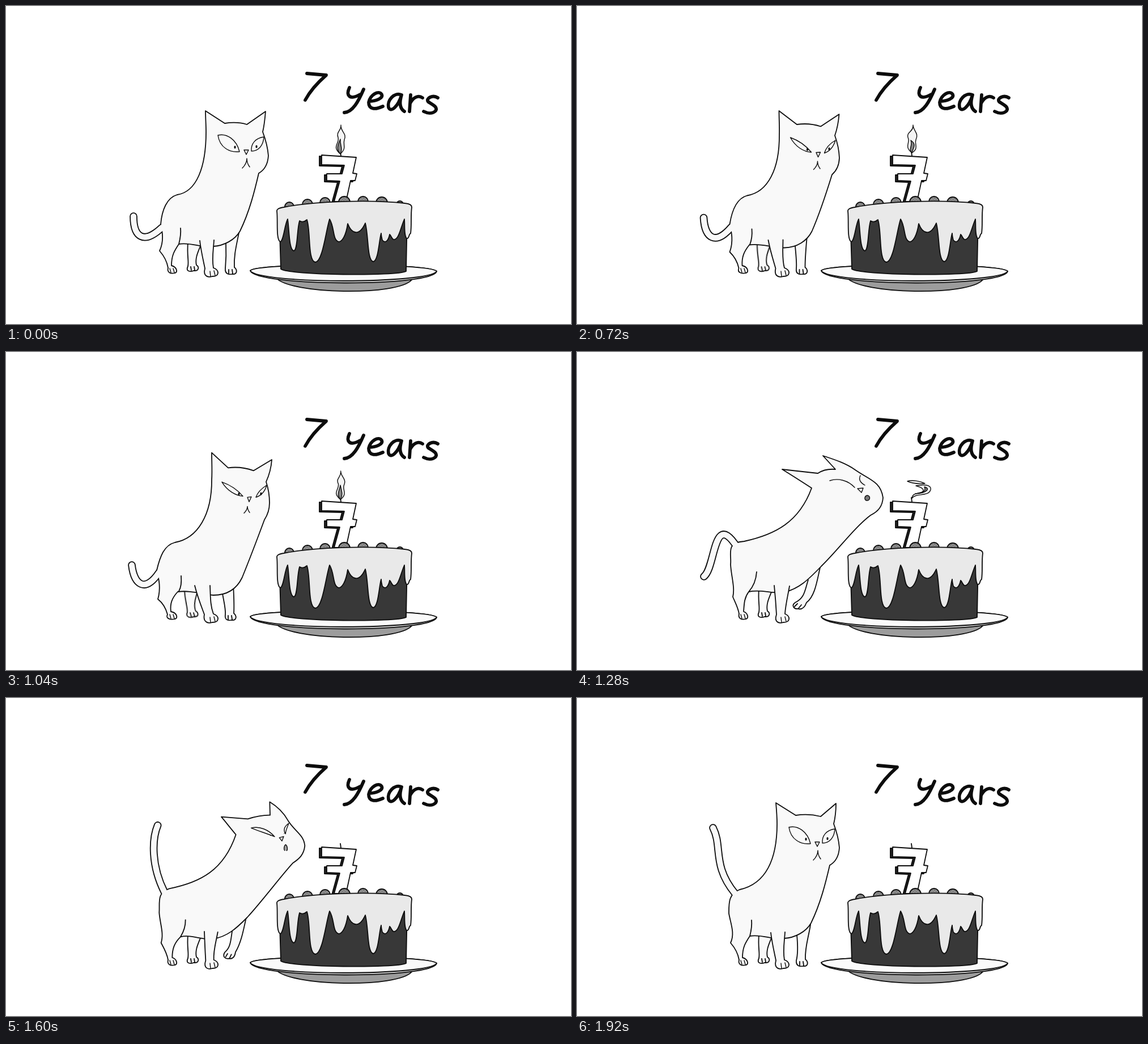
An HTML page that plays this animation: 997 by 561 pixels, repeating every 2410 ms.

```html
<!DOCTYPE html>
<html lang="en">
<head>
<meta charset="utf-8">
<title>7 years</title>
<style>
html, body { margin: 0; width: 100%; height: 100%; overflow: hidden; background: #fff; }
svg { display: block; width: 100%; height: 100%; }
path, circle { stroke: #0c0c0c; stroke-width: 1.8; stroke-linecap: round; stroke-linejoin: round; }
.line { fill: none; }
.fur { fill: #f9f9f9; }
.thin { stroke-width: 1.4; }
.lettering path { fill: none; stroke-width: 5.8; }

/* Drawn on 80 ms steps: most pose changes take two of them */
.anim { animation: 2410ms steps(2) infinite; }
.body { animation-name: body; }
.tail { animation-name: tail; fill: none; stroke-width: 13.6; }
.tail.inside { stroke: #f9f9f9; stroke-width: 10; }
.near { animation-name: near; }
.far { animation-name: far; }
.hind { animation-name: hind; transform-origin: 325px 468px; }
.face { animation-name: face; fill: none; }
.pupils { animation-name: pupils; }
.mouth { animation-name: mouth; }
.puff { animation-name: puff; fill: none; }
.flame { animation-name: flame; fill: #f4f4f4; }
.core { animation-name: core; fill: #858585; }
.wisp { animation-name: wisp; fill: #eee; }
.fire { animation-name: fire; }

@keyframes body {
  0%, 23.237% { animation-timing-function: steps(4); d: path("M352,185 L386,207 C399,205 412,205 425,209 L458,186 C457,198 456,210 453,222 C459,238 462,252 463,264 C462,280 455,290 446,295 C439,325 430,362 413,397 C404,413 384,423 366,424 C345,427 325,416 305,420 C297,432 292,440 292,458 C301,460 304,470 298,471 C290,473 284,470 286,462 C284,450 278,440 271,432 C279,415 276,398 273,385 C275,360 284,338 302,333 C336,328 353,285 353,222 C353,210 352,197 352,185Z M308,392 C309,402 307,412 305,420") }
  36.515% { animation-timing-function: steps(3); d: path("M361,185 L390,211 C405,209 421,211 435,216 L467,196 C466,210 462,224 457,235 C461,247 463,258 463,272 C463,284 459,293 454,300 C444,325 430,362 416,398 C408,416 392,429 366,429 C345,427 325,420 303,423 C293,434 289,444 291,458 C302,460 304,470 298,471 C290,473 281,470 285,463 C282,452 277,443 268,436 C274,415 269,398 266,385 C272,360 279,341 298,336 C338,329 362,290 361,232 C362,217 361,201 361,185Z M309,395 C310,407 308,417 305,422") }
  46.473% { d: path("M364,174 L393,201 C408,199 424,201 438,206 L470,187 C469,201 465,215 460,226 C464,238 466,249 466,263 C466,276 462,286 457,294 C447,322 432,362 417,398 C408,416 392,429 366,429 C345,427 325,420 303,423 C293,434 289,444 291,458 C302,460 304,470 298,471 C290,473 281,470 285,463 C282,452 277,443 268,436 C274,415 269,398 266,385 C272,360 279,341 298,336 C338,329 364,286 364,222 C365,206 364,190 364,174Z M309,395 C310,407 308,417 305,422") }
  53.112% { d: path("M362,207 L425,214 C434,208 445,206 456,207 L434,183 C455,190 474,196 491,208 C515,225 536,228 540,257 C539,272 532,281 518,288 C490,309 460,350 431,378 C407,403 392,417 366,424 C345,427 325,418 303,423 C295,434 295,444 294,458 C301,460 304,470 298,471 C290,473 284,470 286,462 C284,450 278,440 275,432 C279,415 272,395 271,375 C273,355 262,336 295,334 C350,322 392,300 414,240 C397,229 380,218 362,207Z M317,388 C316,402 311,414 303,423") }
  59.751%, 63.07% { animation-timing-function: steps(3); d: path("M392,217 L443,215 C455,210 467,206 480,206 L468,182 C486,188 501,196 512,208 C528,231 549,232 551,257 C549,273 543,279 530,286 C505,304 464,349 431,382 C407,404 394,419 366,425 C348,428 327,417 310,422 C297,432 294,444 294,458 C301,460 304,470 298,471 C290,473 284,470 286,462 C284,450 278,440 275,432 C279,415 272,398 271,378 C273,360 264,342 288,336 C345,324 395,313 425,245 C414,236 403,226 392,217Z M321,391 C321,404 317,412 310,422") }
  73.029% { d: path("M356,195 L394,210 C408,208 424,207 438,208 L460,186 C465,199 467,214 468,231 C474,246 478,258 480,268 C479,283 468,292 458,302 C447,332 434,370 415,397 C404,413 384,424 366,425 C345,427 325,416 304,420 C297,432 292,440 292,458 C301,460 304,470 298,471 C290,473 284,470 286,462 C284,450 278,440 271,432 C279,415 271,398 269,380 C269,362 269,347 288,337 C340,328 363,285 367,233 C363,220 360,208 356,195Z M308,392 C309,402 307,412 304,420") }
  79.668%, 100% { d: path("M351,185 L386,207 C399,205 414,205 430,209 L457,186 C457,198 456,210 453,222 C459,238 462,252 463,264 C462,280 455,290 446,295 C439,325 430,362 413,397 C404,413 384,423 366,424 C345,427 325,416 305,420 C297,432 292,440 292,458 C301,460 304,470 298,471 C290,473 284,470 286,462 C284,450 278,440 271,432 C279,415 271,398 268,380 C268,362 267,346 287,338 C333,328 353,285 353,222 C353,210 352,197 351,185Z M308,392 C309,402 307,412 305,420") }
}
@keyframes tail {
  0%, 23.237% { animation-timing-function: steps(4); d: path("M225,371 C225,408 243,421 275,391") }
  36.515%, 46.473% { d: path("M222,376 C226,410 245,426 270,389") }
  53.112% { d: path("M224,396 C245,380 240,277 283,345") }
  59.751%, 63.07% { animation-timing-function: steps(3); d: path("M280,223 C257,243 262,295 280,342") }
  73.029% { d: path("M243,228 C259,260 243,295 279,344") }
  79.668%, 100% { d: path("M240,229 C257,262 238,295 279,345") }
}
@keyframes near {
  0%, 23.237% { animation-timing-function: steps(4); d: path("M342,414 C344,432 348,448 351,463 C347,478 358,479 364,477 C377,477 377,466 366,462 C363,446 366,430 367,413") }
  36.515%, 46.473% { d: path("M333,412 C338,432 344,447 350,463 C347,478 358,479 364,477 C377,477 377,466 366,462 C360,446 361,430 360,412") }
  53.112% { d: path("M348,412 C350,432 351,445 352,463 C347,478 358,479 364,477 C377,477 377,466 367,462 C368,446 372,430 375,413") }
  59.751%, 63.07% { animation-timing-function: steps(3); d: path("M354,411 C354,430 353,445 353,463 C348,478 358,479 364,477 C377,477 377,466 367,462 C367,446 373,430 377,413") }
  73.029%, 100% { d: path("M342,414 C344,432 348,448 351,463 C347,478 358,479 364,477 C377,477 377,466 366,462 C363,446 366,430 367,413") }
}
@keyframes far {
  0%, 23.237% { animation-timing-function: steps(4); d: path("M388,418 C389,440 388,452 387,463 C386,474 395,474 399,473 C409,474 408,465 403,461 C402,440 406,425 411,400 M393,465 L393,472 M399,465 L400,472") }
  36.515%, 46.473% { d: path("M381,420 C384,440 388,452 387,463 C385,474 394,474 398,473 C408,474 407,465 402,461 C403,445 402,430 401,410 M392,465 L392,472 M398,465 L399,472") }
  53.112% { d: path("M408,402 C402,420 402,434 385,442 C377,448 384,454 390,453 C397,455 402,450 405,442 C421,430 424,400 430,376 M389,444 L384,449 M396,446 L391,452") }
  59.751%, 63.07% { animation-timing-function: steps(3); d: path("M405,405 C400,420 400,434 386,441 C378,448 384,454 390,453 C397,455 402,450 406,442 C421,428 424,405 430,380 M390,444 L385,449 M397,446 L392,452") }
  73.029%, 100% { d: path("M388,418 C390,440 390,452 387,463 C386,474 395,474 399,473 C409,474 408,465 403,461 C402,440 408,425 412,400 M393,465 L393,472 M399,465 L400,472") }
}
@keyframes hind {
  0%, 23.237% { animation-timing-function: steps(4); transform: skewX(0deg) }
  36.515%, 46.473% { transform: skewX(7deg) }
  53.112%, 100% { transform: skewX(0deg) }
}
@keyframes face {
  0% { animation-timing-function: steps(5); d: path("M374,228 C390,224 407,236 412,257 C395,259 377,250 374,228 M455,231 C440,233 432,243 433,256 C445,256 454,247 455,231 M420,254 L428,254 L424,262Z") }
  16.597%, 23.237% { animation-timing-function: steps(4); d: path("M374,228 C388,233 402,244 411,255 C398,255 383,246 374,228 M454,233 C446,237 437,246 434,256 C445,253 450,245 454,233 M420,254 L428,254 L424,262Z") }
  36.515% { animation-timing-function: steps(3); d: path("M379,236 C393,241 407,250 416,261 C403,260 388,251 379,236 M458,241 C450,246 442,253 439,263 C449,259 455,252 458,241 M424,263 L431,262 L427,271Z") }
  46.473% { d: path("M382,226 C396,231 410,240 419,251 C406,250 391,241 382,226 M461,232 C453,237 445,244 442,253 C452,250 458,243 461,232 M427,253 L434,252 L430,261Z") }
  53.112% { d: path("M446,227 C460,222 478,226 490,239 C478,226 460,222 446,227 M500,218 C497,224 499,230 508,235 C499,230 497,224 500,218 M495,241 L505,240 L502,248Z") }
  59.751%, 63.07% { animation-timing-function: steps(3); d: path("M455,231 C470,226 485,230 497,240 C485,230 470,226 455,231 M515,216 C509,223 509,227 516,232 C509,227 509,223 515,216 M505,242 L513,239 L510,247Z") }
  73.029% { d: path("M388,226 C403,225 420,237 428,254 C410,257 391,250 388,226 M467,231 C455,234 447,243 448,255 C460,255 467,247 467,231 M437,255 L444,255 L441,263Z") }
  79.668%, 100% { d: path("M374,228 C390,224 407,236 412,257 C395,259 377,250 374,228 M455,231 C440,233 432,243 433,256 C445,256 454,247 455,231 M420,254 L428,254 L424,262Z") }
}
@keyframes pupils {
  0%, 23.237% { animation-timing-function: steps(4); stroke-width: 3px; d: path("M404,248 L404,250 M442,247 L442,249") }
  36.515% { animation-timing-function: steps(3); stroke-width: 3px; d: path("M409,256 L409,258 M448,255 L448,257") }
  46.473% { stroke-width: 3px; d: path("M412,246 L412,248 M451,246 L451,248") }
  53.112%, 63.07% { animation-timing-function: steps(3); stroke-width: 0px; d: path("M490,239 L490,239 M508,235 L508,235") }
  73.029% { stroke-width: 3px; d: path("M420,248 L420,250 M457,246 L457,248") }
  79.668%, 100% { stroke-width: 3px; d: path("M404,248 L404,250 M442,247 L442,249") }
}
@keyframes mouth {
  0%, 23.237% { animation-timing-function: steps(4); fill: #f9f9f9; d: path("M417,286 C421,282 425,275 425,269 C425,275 427,280 430,284") }
  36.515% { animation-timing-function: steps(3); fill: #f9f9f9; d: path("M418,291 C421,288 424,283 424,279 C424,283 425,286 428,290") }
  46.473% { fill: #f9f9f9; d: path("M421,281 C424,278 427,273 427,269 C427,273 428,276 431,280") }
  53.112% { fill: #777; d: path("M512,262 C506,262 507,254 512,253 C518,253 518,262 512,262") }
  59.751%, 63.07% { animation-timing-function: steps(3); fill: #777; d: path("M519,262 C514,261 514,254 518,254 C523,254 523,262 519,262") }
  73.029% { fill: #f9f9f9; d: path("M437,283 C441,279 444,273 444,268 C444,274 446,279 448,284") }
  79.668%, 100% { fill: #f9f9f9; d: path("M417,286 C421,282 425,275 425,269 C425,275 427,280 430,284") }
}
@keyframes puff {
  0%, 59.75% { opacity: 0; animation-timing-function: step-end }
  59.751% { opacity: 1; animation-timing-function: step-end }
  66.39%, 100% { opacity: 0 }
}
@keyframes flame {
  0%, 23.237% { d: path("M590,261 C574,248 589,243 586,232 C582,222 592,220 591,210 C590,222 602,224 597,236 C594,246 602,250 590,261Z") }
  6.639% { animation-timing-function: steps(3); d: path("M590,260 C575,246 590,243 586,231 C582,222 593,221 591,210 C592,222 602,222 596,236 C594,245 602,251 590,260Z") }
  16.597%, 29.875% { d: path("M591,259 C576,247 589,242 584,232 C581,222 594,222 593,210 C593,220 604,224 598,236 C595,244 604,251 591,259Z") }
  36.515% { animation-timing-function: steps(3); d: path("M591,259 C575,246 589,243 587,233 C580,223 593,222 590,210 C592,218 601,222 595,234 C592,240 606,249 591,259Z") }
  46.473% { d: path("M590,261 C574,248 589,243 586,232 C582,222 592,220 591,210 C590,222 602,224 597,236 C594,246 602,250 590,261Z") }
  53.112% { animation-timing-function: step-end; d: path("M591,258 C592,245 612,252 611,243 C608,238 603,238 598,236 C612,233 626,234 624,243 C620,256 598,248 591,258Z") }
  56.432%, 100% { d: path("M640,247 C655,242 668,247 676,242 C682,239 690,238 700,239 C708,237 720,237 730,240 C705,250 670,252 640,247Z") }
}
@keyframes core {
  0%, 23.237% { d: path("M590,261 C581,252 587,243 590,235 C589,246 595,250 590,261Z") }
  6.639% { animation-timing-function: steps(3); d: path("M590,260 C585,252 591,245 590,235 C596,244 594,252 590,260Z") }
  16.597%, 29.875% { d: path("M591,259 C584,252 593,246 589,237 C600,244 593,251 591,259Z") }
  36.515% { animation-timing-function: steps(3); d: path("M591,258 C585,252 592,245 590,235 C599,247 595,252 591,258Z") }
  46.473% { d: path("M590,261 C581,252 587,243 590,235 C589,246 595,250 590,261Z") }
  53.112% { animation-timing-function: step-end; d: path("M597,250 C608,249 617,246 613,238 C624,240 618,249 597,250Z") }
  56.432%, 100% { d: path("M664,247 C678,246 690,243 703,243 C695,247 680,249 664,247Z") }
}
@keyframes wisp {
  0%, 53.111% { opacity: 0; animation-timing-function: step-end }
  53.112% { opacity: 1; transform: none; animation-timing-function: step-end }
  56.432%, 100% { opacity: 1; transform: translate(66px, 2px) }
}
@keyframes fire {
  0%, 59.75% { opacity: 1; animation-timing-function: step-end }
  59.751%, 100% { opacity: 0 }
}
</style>
</head>
<body>
<svg viewBox="0 0 997 561">
  <defs>
    <pattern id="seeds" width="5" height="5" patternUnits="userSpaceOnUse">
      <rect width="5" height="5" fill="#808080"/>
      <path d="M1,1.5h.4M3.5,3.8h.4" style="stroke:#b4b4b4;stroke-width:1.2"/>
    </pattern>
    <path id="seven" d="M557,263 L618,267 L612,295 L619,296 L616,308 L608,308 L600,345 L579,345 L589,309 L566,308 L566,296 L593,296 L597,281 L557,280Z"/>
  </defs>

  <g class="lettering" role="img" aria-label="7 years">
    <path d="M531,119 L565,122 C549,136 537,149 528,166"/>
    <path d="M606,144 C600,157 605,167 625,156 M631,147 C622,168 612,187 597,188"/>
    <path d="M641,168 C654,168 666,162 663,156 C658,148 643,156 640,170 C640,183 652,183 665,177"/>
    <path d="M698,157 C685,151 672,167 675,179 C679,189 692,177 698,157 C694,170 695,181 703,186"/>
    <path d="M714,157 L712,186 M713,172 C718,162 727,156 735,162"/>
    <path d="M762,162 C753,156 740,163 745,169 C751,173 763,178 758,185 C752,191 743,189 737,186"/>
  </g>

  <g class="plate">
    <path fill="#9c9c9c" d="M476,479 C500,509 692,512 716,483Z"/>
    <path fill="#d0d0d0" d="M431,467 C440,453 750,453 760,468 C754,496 440,495 431,467Z"/>
    <path fill="#fafafa" d="M431,467 C440,453 750,453 760,468 C748,490 446,491 431,467Z"/>
  </g>
  <path fill="#383838" d="M482,368 L485,464 C500,475 690,477 706,468 L708,368Z"/>
  <path class="line" d="M591,264 L590,257"/>
  <use href="#seven" fill="#222" x="-4" y="2"/>
  <use href="#seven" fill="#fff"/>
  <g fill="url(#seeds)">
    <circle cx="500" cy="354" r="8"/><circle cx="532" cy="350" r="9"/>
    <circle cx="563" cy="347" r="9"/><circle cx="597" cy="346" r="10"/>
    <circle cx="630" cy="345" r="9"/><circle cx="663" cy="347" r="10"/>
    <circle cx="695" cy="350" r="6"/>
  </g>
  <path fill="#e9e9e9" d="M478,362 Q477,357 490,355 C540,345 640,341 704,348 Q716,349 716,355 C714,370 716,386 714,401 C710,403 712,411 707,410 C702,405 704,388 703,376 C696,392 693,413 684,412 C681,411 680,406 677,403 C675,413 670,420 664,413 Q662,406 662,401 C658,415 657,450 648,451 C637,449 640,405 634,383 C623,407 610,402 603,384 C600,405 593,416 587,416 C576,413 580,390 571,376 C564,398 559,450 546,452 C532,450 538,397 531,377 Q524,383 518,379 C513,395 515,430 508,432 C499,430 500,395 497,376 C491,388 490,414 484,416 C476,412 480,380 478,362Z"/>

  <g class="anim fire">
    <path class="anim flame thin"/>
    <path class="anim core thin"/>
    <path class="anim wisp thin" d="M583,228 C592,225 606,228 614,232 C603,233 592,232 583,228Z"/>
  </g>

  <g class="cat">
    <path class="anim tail"/>
    <path class="anim hind fur" d="M321,418 C319,440 323,450 321,459 C316,469 326,469 331,467 C341,468 341,460 336,457 C333,444 340,432 344,421 M326,460 L327,466 M332,460 L333,466"/>
    <path class="anim far fur"/>
    <path class="anim body fur"/>
    <path class="anim tail inside"/>
    <path class="anim near fur"/>
    <path class="line thin" d="M289,463 L291,470 M295,463 L297,470 M360,468 L361,477 M367,467 L369,475"/>
    <path class="anim face thin"/>
    <path class="anim pupils"/>
    <path class="anim mouth thin"/>
    <path class="anim puff thin" d="M470,252 C458,268 467,294 504,283"/>
  </g>
</svg>
</body>
</html>
```
